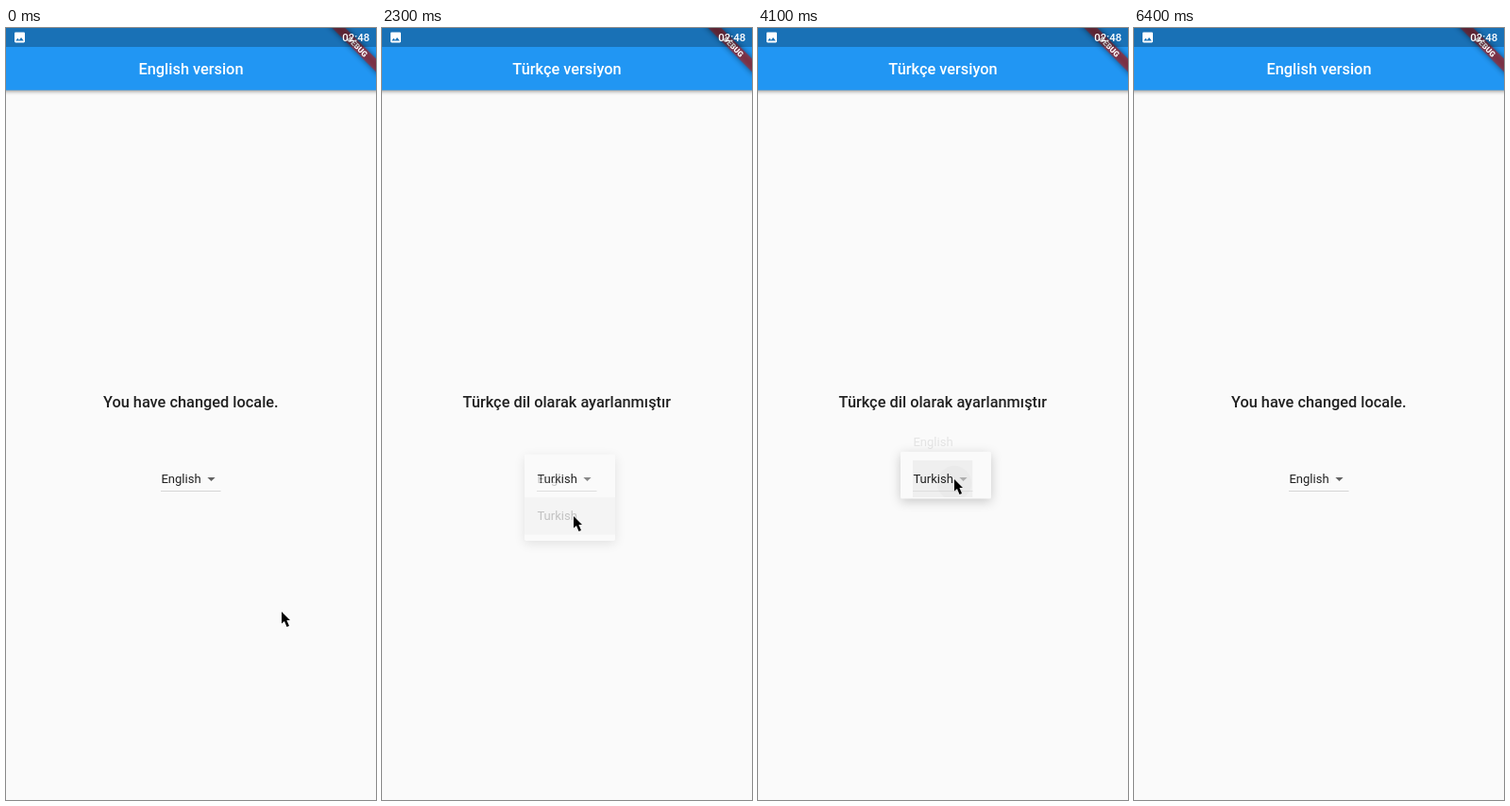
These frames come from a looping animation (392x816 px, 7.4 s). An HTML page:

```html
<!DOCTYPE html>
<html lang="en">
<head>
<meta charset="utf-8">
<title>Locale switch</title>
<style>
  html, body { margin: 0; width: 100%; height: 100%; overflow: hidden; background: #fafafa; }
  svg { display: block; font-family: Roboto, sans-serif; }
  .big { font-size: 16.33px; font-weight: 500; text-anchor: middle; }
  .item { font-size: 13.07px; fill: #212121; }
  #bar { filter: drop-shadow(0 1.5px 2px #0007); }
  #band { filter: drop-shadow(0 0 3px #000c); }
  #panel { filter: drop-shadow(0 3px 6px #0006); }
</style>
</head>
<body>
<svg width="392" height="816" viewBox="0 0 392 816">
  <defs><clipPath id="box"><rect x="164" y="457" width="63.5" height="39"/></clipPath></defs>
  <rect width="392" height="816" fill="#fafafa"/>
  <rect id="bar" x="-10" y="-10" width="412" height="75.7" fill="#2196f3"/>
  <text id="title" class="big" x="196" y="48.7" fill="#fff"></text>
  <text id="message" class="big" x="195.8" y="401" fill="#212121"></text>

  <g id="press" clip-path="url(#box)">
    <rect x="164" y="457" width="63.5" height="39" fill="#e4e4e4"/>
    <circle id="ripple" cy="481" fill="#0000000b"/>
  </g>
  <text id="value" class="item" x="164.4" y="481.1"></text>
  <path d="M213.4 475h8.2l-4.1 4.1z" fill="#616161"/>
  <rect x="164" y="489" width="63.5" height="1" fill="#00000026"/>

  <g id="menu">
    <rect id="panel" x="151" width="96" rx="1.6" fill="#fafafa"/>
    <rect id="hover" x="151" width="96" height="39.2" fill="#00000018"/>
    <text class="item row" x="164.4">English</text>
    <text class="item row" x="164.4">Turkish</text>
  </g>

  <g transform="translate(392 0) rotate(45)">
    <rect id="band" x="-40" y="22.9" width="80" height="9.8" fill="#b71c1ca0"/>
    <text y="30.8" font-size="8.3" font-weight="900" text-anchor="middle" fill="#fff">DEBUG</text>
  </g>
  <rect width="392" height="20" fill="#00000040"/>
  <path transform="translate(7.2 2.6) scale(.61)" fill="#fff" d="M21 19V5c0-1.1-.9-2-2-2H5c-1.1 0-2 .9-2 2v14c0 1.1.9 2 2 2h14c1.1 0 2-.9 2-2zM8.5 13.5l2.5 3 3.5-4.5 4.5 6H5z"/>
  <text x="385.3" y="14.2" font-size="11.43" font-weight="500" text-anchor="end" fill="#fff">02:48</text>
  <path id="cursor" d="M0 0V12.6L3 9.9 5.5 16 8 15 5.4 9.1H9Z"/>
</svg>
<script>
const LOOP = 7400, STEP = 100, ROW = 39.2, PAD = 6.5, TOP = 457;
const $ = id => document.getElementById(id);
const rows = document.querySelectorAll('.row');

// The menu is used twice; `selected` is the row lying over the button.
const visits = [
  { open: 1000, close: 2200, selected: 0, tapX: 217 },
  { open: 4000, close: 5700, selected: 1, tapX: 208 }
];

const moves = [
  { start: 0, time: 600, x: 217, y: 481, bend: 0 },
  { start: 1400, time: 600, x: 203, y: 516, bend: -8 },
  { start: 2700, time: 800, x: 208, y: 477, bend: -12 },
  { start: 4500, time: 700, x: 202, y: 438, bend: 3 },
  { start: 6000, time: 400, x: 268, y: 802, bend: -30 }
];

const ramp = (t, start, time) => Math.min(1, Math.max(0, (t - start) / time));

// Each move slows down towards its end and swings sideways on the way.
function pointer(t) {
  let x = 292, y = 617;
  for (const m of moves) {
    const k = 1 - (1 - ramp(t, m.start, m.time)) ** 2;
    x += (m.x - x) * k + m.bend * Math.sin(Math.PI * k);
    y += (m.y - y) * k;
  }
  return [x, y];
}

function set(el, attrs) {
  for (const name in attrs) el.setAttribute(name, attrs[name]);
}

function draw(now) {
  const t = Math.floor((now % LOOP + .5) / STEP) * STEP % LOOP;
  const turkish = t > visits[0].close && t <= visits[1].close;
  $('title').textContent = turkish ? 'Türkçe versiyon' : 'English version';
  $('message').textContent = turkish ? 'Türkçe dil olarak ayarlanmıştır' : 'You have changed locale.';
  $('value').textContent = turkish ? 'Turkish' : 'English';

  const { open, close, selected, tapX } = visits[t < 2500 ? 0 : 1];
  set($('press'), { opacity: t < open + 300 ? ramp(t, open - 200, 200) : 0 });
  set($('ripple'), { cx: tapX, r: 30 * ramp(t, open - 100, 330) });

  // The panel unfolds from the selected row.
  const grow = ramp(t, open + 50, 250);
  const first = TOP - selected * ROW;
  const top = TOP + (first - PAD - TOP) * grow;
  set($('menu'), { opacity: ramp(t, open, 200) * (1 - ramp(t, close, 200)) ** 2 });
  set($('panel'), { y: top, height: ROW + (ROW + 2 * PAD) * grow });
  set($('hover'), { y: first + (1 - selected) * ROW, opacity: ramp(t, close - 100, 100) });
  rows.forEach((row, i) => set(row, { y: first + i * ROW + 24.1, opacity: i === selected ? 1 : grow }));

  set($('cursor'), {
    transform: `translate(${pointer(t)})`,
    visibility: t < 6400 ? 'visible' : 'hidden'
  });
  requestAnimationFrame(draw);
}
draw(0);
</script>
</body>
</html>
```
